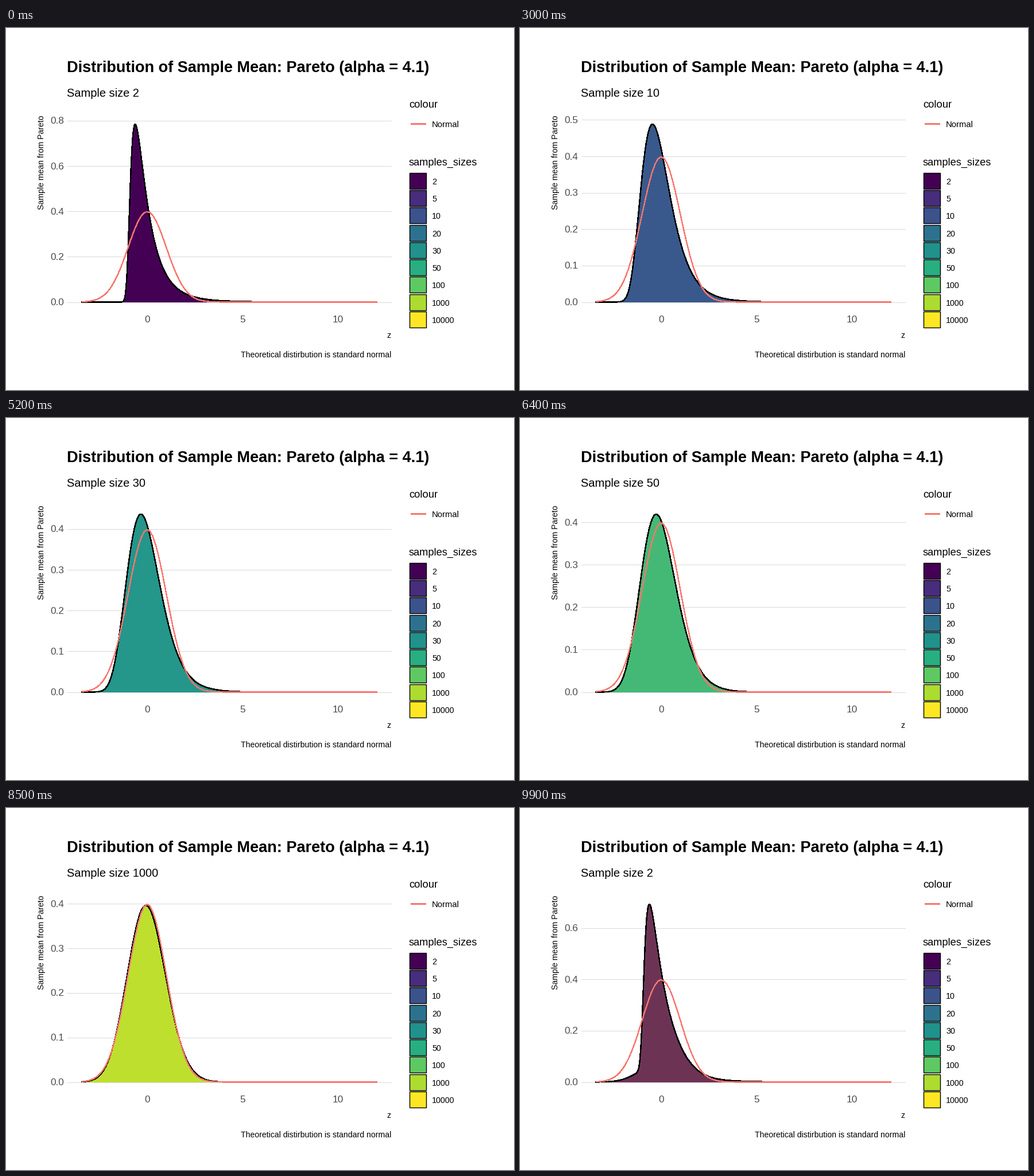
These frames come from a looping animation (885 by 632 pixels, 10000 ms). A matplotlib script:

```python
import numpy as np
import matplotlib.pyplot as plt
from matplotlib.animation import FuncAnimation
from matplotlib.patches import Polygon, Rectangle

W, H, DPI = 885, 632, 64
PT = 72 / DPI                       # points per pixel
X0, UNIT, BASE, PEAK = 246, 33.2, 478.5, 310.5
LEFT, RIGHT, LEGEND = 106.5, 671, 702
Z_MIN, Z_MAX = -3.42, 12.05
ALPHA = 4.1
RED, GREY, RULE = "#F8766D", "#4D4D4D", "#D9D9D9"

SIZES = [2, 5, 10, 20, 30, 50, 100, 1000, 10000]
FILLS = plt.get_cmap("viridis")(np.linspace(0, 1, len(SIZES)))[:, :3]

# Each state rests for HOLD frames, then blends into the next one.
HOLD = 6
LENGTHS = np.array([6] * 2 + [5] * 7)
STARTS = HOLD * np.arange(1, 10) + np.cumsum(LENGTHS) - LENGTHS

plt.rcParams["font.family"] = "Liberation Sans"
z = np.linspace(Z_MIN, Z_MAX, 700)

# Pareto quantiles, standardised; densities follow by Fourier inversion.
draws = ((np.arange(8000) + 0.5) / 8000) ** (-1 / ALPHA)
draws = (draws - draws.mean()) / draws.std()
DT = 0.1
freq = np.arange(0, 45, DT)
weight = np.where(freq == 0, 0.5, 1) * DT / np.pi
waves = np.exp(-1j * np.outer(z, freq))


def normal(t):
    return np.exp(-t * t / 2) / np.sqrt(2 * np.pi)


def mean_density(n):
    """Kernel-smoothed density of the standardised mean of n draws."""
    width = 0.143 - 0.05 / np.sqrt(n)
    phi = np.exp(1j * np.outer(freq / np.sqrt(n), draws)).mean(axis=1)
    spectrum = phi ** n * np.exp(-(width * freq) ** 2 / 2) * weight
    return np.maximum((waves @ spectrum).real, 0)


DENSITIES = [mean_density(n) for n in SIZES]

# Colours blend in Lab space.
TO_XYZ = np.array([[0.4124, 0.3576, 0.1805],
                   [0.2126, 0.7152, 0.0722],
                   [0.0193, 0.1192, 0.9505]])
WHITE = TO_XYZ.sum(axis=1)
TO_LAB = np.array([[0, 116, 0], [500, -500, 0], [0, 200, -200]])


def to_lab(c):
    lin = np.where(c > 0.04045, ((c + 0.055) / 1.055) ** 2.4, c / 12.92)
    t = TO_XYZ @ lin / WHITE
    return TO_LAB @ np.where(t > 0.008856, np.cbrt(t), 7.787 * t + 16 / 116)


def from_lab(lab):
    f = np.linalg.solve(TO_LAB, lab)
    t = np.where(f > 0.2069, f ** 3, (f - 16 / 116) / 7.787)
    lin = np.clip(np.linalg.solve(TO_XYZ, t * WHITE), 0, 1)
    c = np.where(lin > 0.0031308, 1.055 * lin ** (1 / 2.4) - 0.055, 12.92 * lin)
    return tuple(np.clip(c, 0, 1))


LABS = [to_lab(c) for c in FILLS]

fig = plt.figure(figsize=(W / DPI, H / DPI), dpi=DPI, facecolor="white")
ax = fig.add_axes([0, 0, 1, 1])
ax.set(xlim=(0, W), ylim=(H, 0))
ax.axis("off")


def label(x, y, s, size, **kw):
    return ax.text(x, y, s, fontsize=size * PT,
                   **{"color": "black", "va": "baseline", **kw})


def stroke(x, y, color, width, **kw):
    return ax.plot(x, y, color=color, lw=width * PT, antialiased=False, **kw)[0]


label(106, 77, "Distribution of Sample Mean: Pareto (alpha = 4.1)", 27.15,
      weight="bold")
subtitle = label(106, 120, "", 20)
label(66, 152, "Sample mean from Pareto", 14, rotation=90,
      rotation_mode="anchor", ha="right")
label(RIGHT, 541, "z", 14, ha="right")
label(RIGHT, 575, "Theoretical distirbution is standard normal", 14, ha="right")
for tick in (0, 5, 10):
    label(X0 + tick * UNIT, 509, str(tick), 17.3, ha="center", va="center",
          color=GREY)

label(LEGEND, 139, "colour", 18.4)
stroke([705.5, 730], [166.5, 166.5], RED, 1.2)
label(LEGEND + 40, 173, "Normal", 14.7)
label(LEGEND, 240, "samples_sizes", 18.2)
for k, (size, fill) in enumerate(zip(SIZES, FILLS)):
    cy = 266.8 + 30.28 * k
    ax.add_patch(Rectangle((LEGEND + 0.5, cy - 14), 29, 28, fc=fill,
                           ec="black", lw=1.4 * PT))
    label(LEGEND + 40, cy + 2, str(size), 14.3, va="center")

grid = [(stroke([LEFT, RIGHT], [0, 0], RULE, 1, zorder=1),
         label(101, 0, "", 17.3, ha="right", va="center", color=GREY))
        for _ in range(6)]
px = X0 + z * UNIT
area = ax.add_patch(Polygon([(0, 0), (1, 0), (1, 1)], lw=0, zorder=2,
                            antialiased=False))
outline = stroke(px, px, "black", 1.4, zorder=3, solid_capstyle="projecting")
bell_z = np.linspace(Z_MIN, Z_MAX, 101)
bell = stroke(X0 + bell_z * UNIT, bell_z, RED, 1.25, zorder=4,
              solid_capstyle="butt")


def state_at(n):
    """Previous state, next state and blend weight."""
    k = int(np.searchsorted(STARTS, n, side="right")) - 1
    if k < 0:
        return 0, 0, 0.0
    return k, (k + 1) % len(SIZES), min(1, (n - STARTS[k] + 1) / LENGTHS[k])


def update(n):
    a, b, w = state_at(n)
    dens = (1 - w) * DENSITIES[a] + w * DENSITIES[b]
    top = max(dens.max(), normal(0))
    scale = PEAK / top

    y = BASE - dens * scale
    area.set_xy(np.vstack([(px[0], BASE), np.column_stack([px, y]),
                           (px[-1], BASE)]))
    area.set_facecolor(from_lab((1 - w) * LABS[a] + w * LABS[b]))
    outline.set_ydata(y)
    bell.set_ydata(BASE - normal(bell_z) * scale)
    subtitle.set_text(f"Sample size {SIZES[b if w >= 0.5 else a]}")

    step = 0.1 if top < 0.54 else 0.2
    for i, (line, text) in enumerate(grid):
        v = i * step
        gy = BASE - v * scale
        shown = v <= 1.05 * top
        line.set_visible(shown)
        text.set_visible(shown)
        line.set_ydata([gy, gy])
        text.set_y(gy + 1)
        text.set_text(f"{v:.1f}")
    return []


anim = FuncAnimation(fig, update, frames=100, interval=100, repeat=True,
                     repeat_delay=0, blit=False)
plt.show()
```
